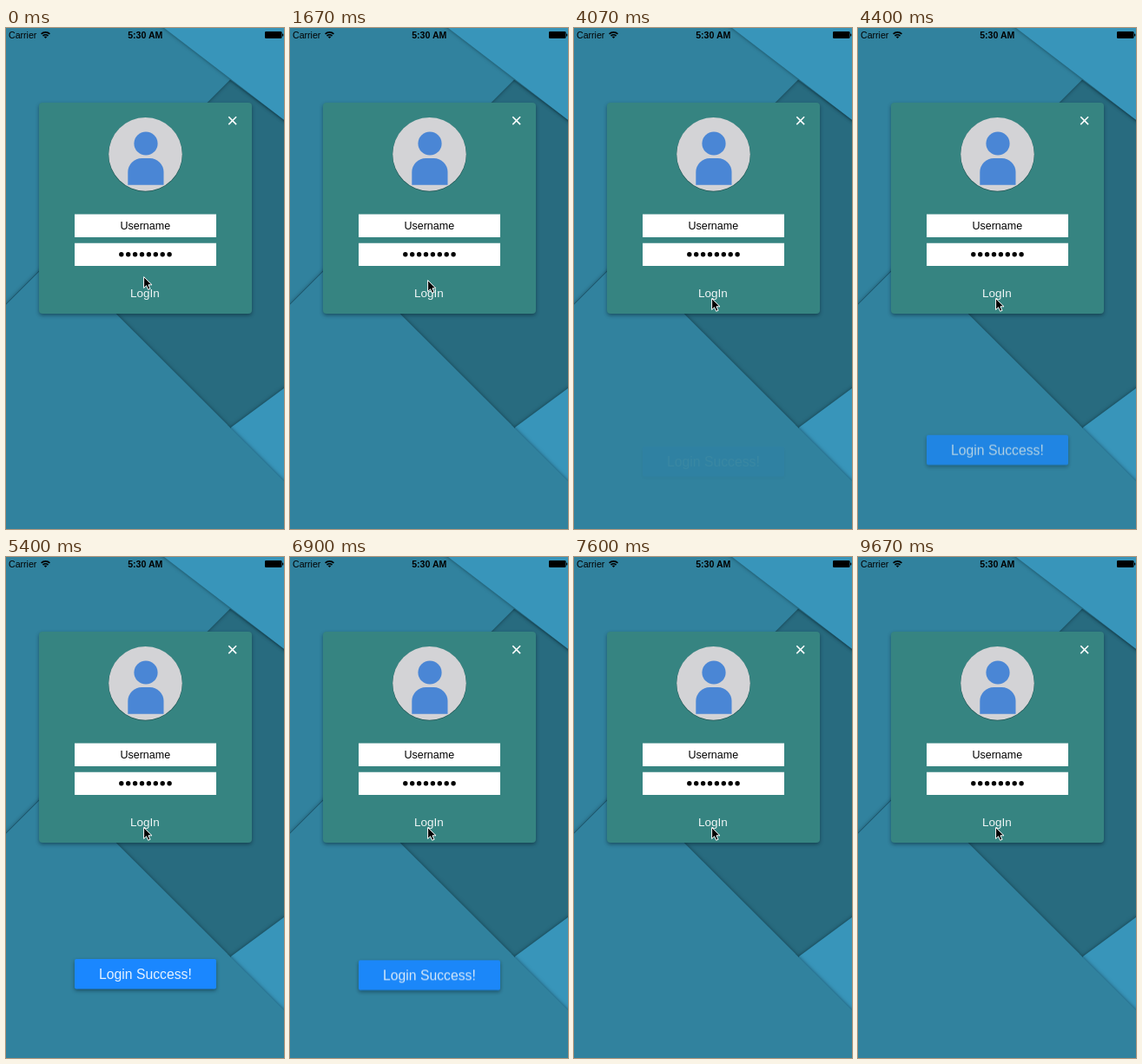
Write an HTML page that moves like this. It is 320x577 px and loops after 9.73 s.

```html
<!DOCTYPE html>
<html lang="en">
<head>
<meta charset="utf-8">
<title>Login card</title>
<style>
  html, body { margin: 0; width: 100%; height: 100%; overflow: hidden; background: #31829e; }
  svg { display: block; width: 320px; height: 577px; font-family: "Liberation Sans", Arial, sans-serif; }
  .sheet { filter: drop-shadow(0 0 2px rgba(0, 20, 30, .55)); }
  .raised { filter: drop-shadow(0 2px 2px rgba(0, 20, 30, .45)); }
  .mid { text-anchor: middle; }
</style>
</head>
<body>
<svg viewBox="0 0 320 577">
  <!-- paper background -->
  <rect width="320" height="577" fill="#286b7f"/>
  <path class="sheet" d="M259 460 L330 407.5 V540 H259Z" fill="#3895ba"/>
  <path class="sheet" d="M-10 -10 H330 V113 L258 59.5 L-10 328Z" fill="#31829e"/>
  <path class="sheet" d="M-10 328.5 L58 260.5 L330 532 V590 H-10Z" fill="#31829e"/>
  <path class="sheet" d="M169 -10 L330 113.5 V-10Z" fill="#3895ba"/>

  <!-- status bar -->
  <text x="3" y="11.6" font-size="10.6">Carrier</text>
  <g fill="none" stroke="#000" stroke-width="1.6">
    <path d="M40.6 6.9 a7 7 0 0 1 9.8 0"/>
    <path d="M42.5 9.1 a4.3 4.3 0 0 1 6 0"/>
  </g>
  <path d="M45.5 12 l-1.7 -1.8 a2.5 2.5 0 0 1 3.4 0Z"/>
  <text class="mid" x="160.3" y="11.6" font-size="10.6" font-weight="700">5:30 AM</text>
  <rect x="298" y="4" width="19.5" height="8" rx="1.3"/>
  <rect x="318" y="6.5" width="1.2" height="3" rx=".5"/>

  <!-- card -->
  <rect class="raised" x="38" y="86" width="245" height="243" rx="4" fill="#368481"/>
  <path d="M256.3 102.3 l8.8 8.8 m0 -8.8 l-8.8 8.8" stroke="#fff" stroke-width="1.6"/>
  <circle cx="160.5" cy="146" r="42.6" fill="#1f5553"/>
  <circle cx="160.5" cy="145.4" r="42.3" fill="#d3d3d6"/>
  <g fill="#4a86d5">
    <circle cx="161" cy="133" r="13.6"/>
    <path d="M140.3 180.7 V166 a16 16 0 0 1 16 -16 h9.2 a16 16 0 0 1 16 16 V180.7Z"/>
  </g>
  <path d="M79 214.5 h163 v26.5 h-163Z m0 33.3 h163 v26.2 h-163Z" fill="#fff"/>
  <text class="mid" x="160.3" y="232" font-size="12.5">Username</text>
  <path d="M132.8 260.8 h56" stroke="#000" stroke-width="5.4" stroke-linecap="round" stroke-dasharray="0 7.9"/>
  <text class="mid" x="160" y="310.2" font-size="13.5" fill="#f0f6f6">LogIn</text>

  <!-- toast -->
  <g id="toast" opacity="0">
    <rect class="raised" x="79" y="463" width="163" height="34.5" rx="2" fill="#1a87ff"/>
    <text class="mid" x="160.4" y="485.7" font-size="15.75" fill="#e4f1ff">Login Success!</text>
  </g>

  <g id="pointer">
    <path d="M158.6 286.5 v13 l3 -2.8 l2.1 4.6 l2.3 -1 l-2.1 -4.5 h4.1Z" stroke="#fff" stroke-width="1"/>
  </g>
</svg>
<script>
const LOOP = 9730;

// steps: [time in ms, y offset, opacity]
function play(id, steps) {
  const frames = steps.map(([t, y, opacity]) => ({
    offset: t / LOOP,
    transform: `translateY(${y}px)`,
    opacity,
    easing: "ease-in-out"
  }));
  const anim = document.getElementById(id).animate(frames, { duration: LOOP, iterations: Infinity });
  anim.startTime = document.timeline.currentTime;
}

play("toast", [
  [0, 20, 0], [3960, 20, 0], [4660, 0, 1],
  [6775, 0, 1], [7475, 20, 0], [LOOP, 20, 0]
]);

play("pointer", [[0, 0, 1], [1450, 0, 1], [2250, 25, 1], [LOOP, 25, 1]]);
</script>
</body>
</html>
```
